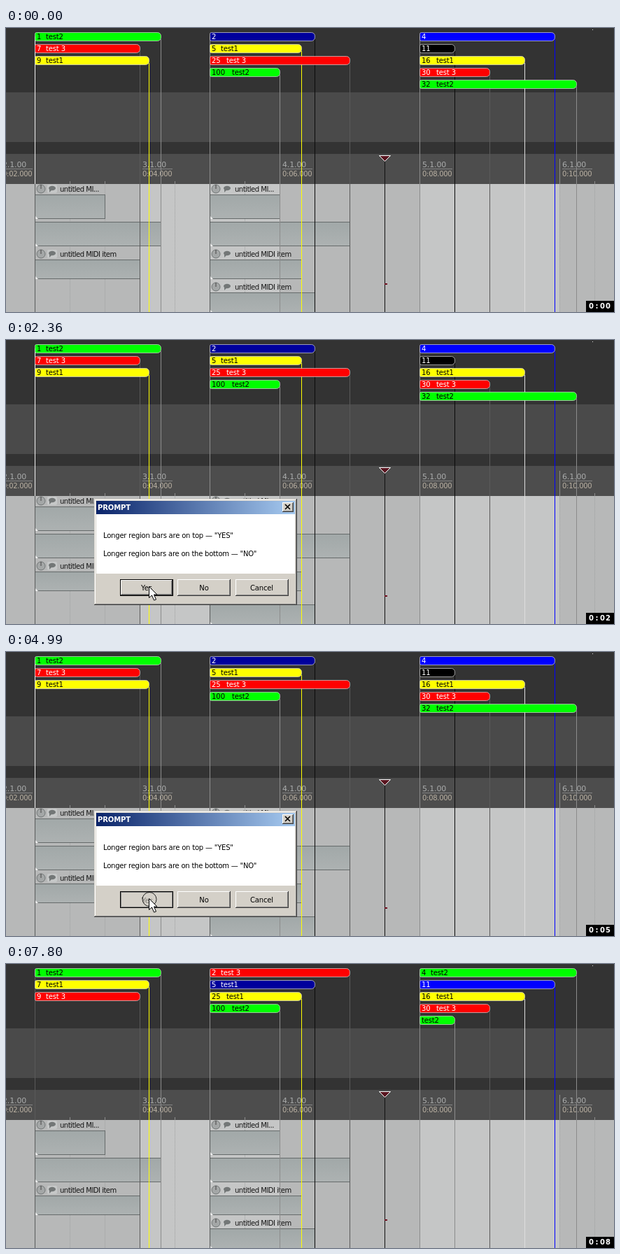
These frames come from a looping animation (869x406 px, 8000 ms). An HTML page with a canvas:

```html
<!DOCTYPE html>
<html lang="en">
<head>
<meta charset="utf-8">
<style>
html, body { margin: 0; width: 869px; height: 406px; overflow: hidden; background: #333; }
canvas { display: block; }
</style>
</head>
<body>
<canvas id="stage" width="869" height="406"></canvas>
<script>
const c = document.getElementById('stage').getContext('2d');
const W = 869, H = 406;
const GREEN = '#00ff00', RED = '#ff0000', YELLOW = '#ffff00', NAVY = '#00009c', BLUE = '#0000ff', BLACK = '#000000';
const FACE = '#d4d0c8';

function rect(x, y, w, h, color) {
  c.fillStyle = color;
  c.fillRect(x, y, w, h);
}

function text(s, x, y, color, spacing = 0, font = '10px', align = 'left') {
  c.font = font + ' "DejaVu Sans", sans-serif';
  c.letterSpacing = spacing + 'px';
  c.textAlign = align;
  c.fillStyle = color;
  c.fillText(s, x, y);
}

function poly(points, fill, stroke) {
  c.beginPath();
  points.forEach(([x, y]) => c.lineTo(x, y));
  c.closePath();
  c.fillStyle = fill;
  c.fill();
  if (stroke) {
    c.strokeStyle = stroke;
    c.lineWidth = 1;
    c.stroke();
  }
}

// Region columns: left edge, then bars as [number, name, colour, right edge]
const before = [
  [41, '#f0f0f0', [['1', 'test2', GREEN, 221], ['7', 'test 3', RED, 191], ['9', 'test1', YELLOW, 204]]],
  [291, '#8c8c8c', [['2', '', NAVY, 441], ['5', 'test1', YELLOW, 422], ['25', 'test 3', RED, 491], ['100', 'test2', GREEN, 391]]],
  [591, '#8c8c8c', [['4', '', BLUE, 784], ['11', '', BLACK, 641], ['16', 'test1', YELLOW, 741], ['30', 'test 3', RED, 691], ['32', 'test2', GREEN, 815]]]
];
const after = [
  [41, '#5a5a5a', [['1', 'test2', GREEN, 221], ['7', 'test1', YELLOW, 204], ['9', 'test 3', RED, 191]]],
  [291, '#8c8c8c', [['2', 'test 3', RED, 491], ['5', 'test1', NAVY, 441], ['25', 'test1', YELLOW, 422], ['100', 'test2', GREEN, 391]]],
  [591, '#8c8c8c', [['4', 'test2', GREEN, 815], ['11', '', BLUE, 784], ['16', 'test1', YELLOW, 741], ['30', 'test 3', RED, 691], ['', 'test2', GREEN, 641]]]
];
const edgeColor = { [GREEN]: '#8c8c8c', [RED]: '#5a5a5a', [YELLOW]: YELLOW, [NAVY]: '#0a0a0a', [BLACK]: '#0a0a0a', [BLUE]: BLUE };

function drawBackdrop() {
  rect(0, 0, W, H, '#333333');
  rect(0, 92, W, 71, '#4a4a4a');
  rect(0, 180, W, 43, '#4d4d4d');
  rect(0, 223, W, 183, '#b7b8b8');
  rect(838, 2, 1, 1, '#ddd');
  for (let x = 191; x < W; x += 400) if (x < 791) rect(x, 223, 200, 183, '#c5c6c6');
  for (let x = 41; x < W; x += 50) {
    rect(x, 219, 1, 4, '#8c8c8c');
    for (let y = 223; y < H; y += 2) rect(x, y, 1, 1, '#9fa1a1');
  }
  for (let bar = 0; bar < 5; bar++) {
    const x = bar * 200 - 9;
    rect(x, 187, 1, 36, '#8c8c8c');
    text(bar + 2 + '.1.00', x + 4, 199, '#aaacac', -0.15, '11px');
    rect(x + 4, 201, 43, 1, '#858585');
    text('0:' + String(bar * 2 + 2).padStart(2, '0') + '.000', x + 4, 212, '#b9b0a2', -0.3);
  }
}

function drawItem(x, y, w, h, label) {
  if (label) {
    const mid = y - 8;
    c.beginPath();
    c.arc(x + 9, mid, 6, 0, 7);
    c.fillStyle = '#a4a7a7';
    c.fill();
    c.strokeStyle = '#707575';
    c.lineWidth = 1;
    c.stroke();
    rect(x + 8.5, mid - 6, 1, 6, '#444');
    c.beginPath();
    c.roundRect(x + 18, mid - 6, 14, 12, 2);
    c.fillStyle = '#c6c8c8';
    c.fill();
    c.beginPath();
    c.ellipse(x + 25, mid - 1, 5, 3.2, 0, 0, 7);
    c.fillStyle = '#737777';
    c.fill();
    poly([[x + 21, mid], [x + 25, mid + 1], [x + 21, mid + 5]], '#737777');
    text(label, x + 36, y - 4, '#141414', -0.5);
  }
  const shade = c.createLinearGradient(0, y, 0, y + h);
  shade.addColorStop(0, '#a1a8a8');
  shade.addColorStop(1, '#adb2b2');
  rect(x, y, w, h, shade);
  c.strokeStyle = '#666b6b';
  c.lineWidth = 1;
  c.strokeRect(x + 0.5, y + 0.5, w - 1, h - 1);
  poly([[x, y + h - 5], [x + 5, y + h], [x, y + h]], '#eee');
}

function drawItems() {
  const short = 'untitled MI...', full = 'untitled MIDI item';
  drawItem(41, 238, 101, 35, short);
  drawItem(41, 277, 181, 35);
  drawItem(41, 331, 151, 28, full);
  drawItem(291, 238, 101, 35, short);
  drawItem(291, 277, 201, 35);
  drawItem(291, 331, 132, 28, full);
  drawItem(291, 378, 151, 29, full);
}

function drawRegions(columns) {
  for (const [x, startColor, bars] of columns) {
    rect(x, 12, 1, 211, startColor);
    rect(x, 223, 1, 183, x < 591 ? '#5a5c5c' : '#8c8c8c');
    bars.forEach(([, , color, end], i) => {
      const y = 16 + 17 * i;
      rect(end, y, 1, H - y, end === 741 ? '#dedede' : edgeColor[color]);
    });
  }
  for (const [x, , bars] of columns) {
    bars.forEach(([num, name, color, end], i) => {
      const y = 6 + 17 * i;
      c.beginPath();
      c.roundRect(x + 0.5, y + 0.5, end - x, 12, [2, 5, 5, 2]);
      c.fillStyle = color;
      c.fill();
      c.strokeStyle = 'rgba(225,225,225,.65)';
      c.lineWidth = 1;
      c.stroke();
      const ink = color === GREEN || color === YELLOW ? '#000' : '#fff';
      text(num, x + 3, y + 10, ink);
      text(name, x + (num ? 8 + 8 * num.length : 3), y + 10, ink, -0.15);
    });
  }
}

function drawEditCursor() {
  rect(541, 190, 1, 216, '#111');
  poly([[533.5, 182.5], [549.5, 182.5], [541.5, 190.5]], '#5a1520', '#fff');
  rect(541, 363, 1, 6, '#111');
  rect(541, 365, 4, 2, '#701020');
}

function bevel(x, y, w, h, light, dark) {
  rect(x, y, w, 1, light);
  rect(x, y, 1, h, light);
  rect(x, y + h - 1, w, 1, dark);
  rect(x + w - 1, y, 1, h, dark);
}

function button(x, y, w, h, pressed) {
  rect(x, y, w, h, FACE);
  if (pressed) bevel(x, y, w, h, '#808080', '#808080');
  else {
    bevel(x, y, w, h, '#fff', '#404040');
    bevel(x + 1, y + 1, w - 2, h - 2, FACE, '#808080');
  }
}

function drawDialog(pressed) {
  rect(126, 227, 290, 152, FACE);
  bevel(126, 227, 290, 152, FACE, '#404040');
  bevel(127, 228, 288, 150, '#fff', '#808080');
  const title = c.createLinearGradient(129, 0, 413, 0);
  title.addColorStop(0, '#0a246a');
  title.addColorStop(1, '#a6caf0');
  rect(129, 230, 284, 19, title);
  text('PROMPT', 131, 243, '#fff', -0.1, 'bold 10px');
  button(395, 232, 16, 14);
  c.strokeStyle = '#000';
  c.lineWidth = 1.6;
  c.beginPath();
  c.moveTo(399, 235); c.lineTo(406, 242);
  c.moveTo(406, 235); c.lineTo(399, 242);
  c.stroke();
  rect(129, 249, 284, 85, '#fff');
  text('Longer region bars are on top — "YES"', 139, 283, '#000', -0.2);
  text('Longer region bars are on the bottom — "NO"', 139, 309, '#000', -0.23);
  rect(163, 342, 76, 24, '#000');
  button(164, 343, 74, 22, pressed);
  button(245, 342, 76, 24);
  button(328, 342, 76, 24);
  const push = pressed ? 1 : 0;
  text('Yes', 201 + push, 358 + push, '#000', 0, '10px', 'center');
  text('No', 283, 358, '#000', 0, '10px', 'center');
  text('Cancel', 365.5, 358, '#000', -0.15, '10px', 'center');
}

function drawArrow(x, y) {
  const shape = [[0, 0], [0, 16], [4, 12.5], [7, 19.5], [10, 18.5], [7, 11.5], [11.5, 11.5]];
  poly(shape.map(([dx, dy]) => [x + 0.5 + dx, y + 0.5 + dy]), '#fff', '#000');
}

function drawBeam(x, y) {
  c.globalCompositeOperation = 'difference';
  rect(x, y, 3, 1, '#fff');
  rect(x + 4, y, 3, 1, '#fff');
  rect(x + 3, y + 1, 1, 14, '#fff');
  rect(x, y + 15, 3, 1, '#fff');
  rect(x + 4, y + 15, 3, 1, '#fff');
  c.globalCompositeOperation = 'source-over';
}

// Pointer positions as [time, x, y], each held until the next
const arrowPath = [[1850, 236, 379], [1970, 233, 376], [2120, 222, 366], [2240, 209, 356], [2360, 204, 352]];
const ticks = [960, 1970, 2920, 3850, 4840, 5820, 6850, 7800];

function drawPointer(t) {
  if (t >= 5110) {
    if (t < 6970) drawBeam(203, 345);
    else if (t < 7120) drawBeam(217, 350);
    return;
  }
  if (t >= 4990) {
    c.beginPath();
    c.arc(205, 353.5, 10, 0, 7);
    c.fillStyle = 'rgba(212,208,200,.6)';
    c.fill();
    c.strokeStyle = '#222';
    c.lineWidth = 1;
    c.stroke();
  }
  const spot = arrowPath.findLast(p => t >= p[0]);
  if (spot) drawArrow(spot[1], spot[2]);
}

function drawTimer(t) {
  rect(829, 390, 40, 16, '#000');
  const seconds = ticks.filter(time => t >= time).length;
  [...('0:0' + seconds)].forEach((ch, i) =>
    text(ch, 836.5 + 8 * i, 401, '#fff', 0, 'bold 10px', 'center'));
}

function frame() {
  const t = performance.now() % 8000;
  drawBackdrop();
  drawItems();
  drawRegions(t < 5110 ? before : after);
  drawEditCursor();
  if (t >= 1390 && t < 5110) drawDialog(t >= 4990);
  drawPointer(t);
  drawTimer(t);
  requestAnimationFrame(frame);
}
frame();
</script>
</body>
</html>
```
